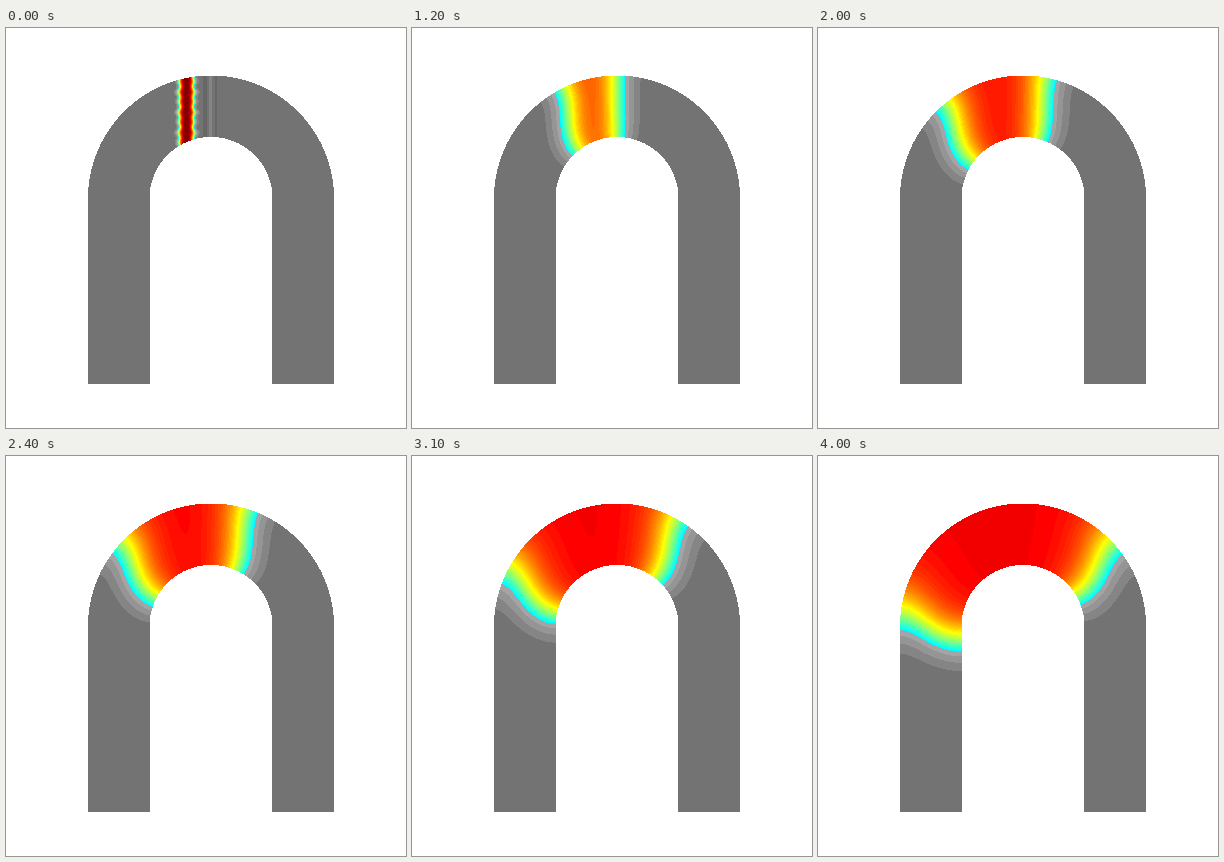
These frames come from a looping animation (400x400 px, 4.1 s). An HTML page with a canvas:

```html
<!DOCTYPE html>
<html>
<head>
<meta charset="utf-8">
<style>
html, body { margin: 0; width: 100%; height: 100%; overflow: hidden; background: #fff; }
canvas { display: block; }
</style>
</head>
<body>
<canvas id="stage" width="400" height="400"></canvas>
<script>
const SIZE = 400, CX = 205, CY = 170.5, INNER = 61.5, OUTER = 123, BOTTOM = 356;
const FRAMES = 41, FRAME_MS = 100;
const SUBSTEPS = 60, DIFFUSION = 13.2, GROWTH = 0.245, CAPACITY = 0.8865;
const ACTIVE_BOTTOM = 260;

const ctx = document.getElementById('stage').getContext('2d');
const image = ctx.createImageData(SIZE, SIZE);
const pixels = new Uint32Array(image.data.buffer).fill(0xffffffff);

const rgb = (r, g, b) => (0xff000000 | b << 16 | g << 8 | r) >>> 0;
const grey = v => rgb(v, v, v);

function color(v) {
  if (v < -0.06) return grey(103);
  if (v < 0.11) return grey(115);
  if (v < 0.2) return grey(133);
  if (v < 0.29) return grey(149);
  if (v < 0.36) return grey(164);
  const q = Math.round(Math.min(v, 1) * 80) / 80;
  const channel = peak => Math.round(255 * Math.max(0, Math.min(1, 1.5 - Math.abs(4 * q - peak))));
  return rgb(channel(3), channel(2), channel(1));
}

function inside(x, y) {
  const dx = x + 0.5 - CX, dy = Math.min(0, y + 0.5 - CY);
  const r = Math.hypot(dx, dy);
  return y < BOTTOM && r >= INNER && r <= OUTER;
}

// Heated strip with a wavy edge and a faint ripple beside it
function initial(x, y) {
  const wave = 0.7 * Math.sin(y * 0.62) + 0.4 * Math.sin(y * 0.31);
  const strip = Math.exp(-((Math.abs(x - 180) / (8.7 + wave)) ** 3));
  const ripple = 0.14 * Math.cos((x - 204) * 0.52) * Math.exp(-(((x - 203) / 9) ** 2));
  return strip + ripple;
}

const cells = [], lookup = new Map();
for (let y = 0; y < BOTTOM; y++) {
  for (let x = 0; x < SIZE; x++) {
    if (!inside(x, y)) continue;
    const p = y * SIZE + x;
    pixels[p] = grey(115);
    if (y < ACTIVE_BOTTOM) {
      lookup.set(p, cells.length);
      cells.push(p);
    }
  }
}

// Insulated walls: a missing neighbour is the cell itself
const neighbours = offset => Int32Array.from(cells, (p, i) => lookup.get(p + offset) ?? i);
const left = neighbours(-1), right = neighbours(1), up = neighbours(-SIZE), down = neighbours(SIZE);

function step(u, next) {
  const d = DIFFUSION / SUBSTEPS, g = GROWTH / SUBSTEPS;
  for (let i = 0; i < u.length; i++) {
    const v = u[i];
    next[i] = v + d * (u[left[i]] + u[right[i]] + u[up[i]] + u[down[i]] - 4 * v)
      + g * v * (1 - v / CAPACITY);
  }
}

let field = Float32Array.from(cells, p => initial(p % SIZE, Math.floor(p / SIZE)));
let spare = new Float32Array(field.length);
const history = [field.slice()];
while (history.length < FRAMES) {
  for (let k = 0; k < SUBSTEPS; k++) {
    step(field, spare);
    [field, spare] = [spare, field];
  }
  history.push(field.slice());
}

let shown = -1;
function draw() {
  const frame = Math.floor(performance.now() / FRAME_MS) % FRAMES;
  if (frame !== shown) {
    shown = frame;
    history[frame].forEach((v, i) => { pixels[cells[i]] = color(v); });
    ctx.putImageData(image, 0, 0);
  }
  requestAnimationFrame(draw);
}
draw();
</script>
</body>
</html>
```
